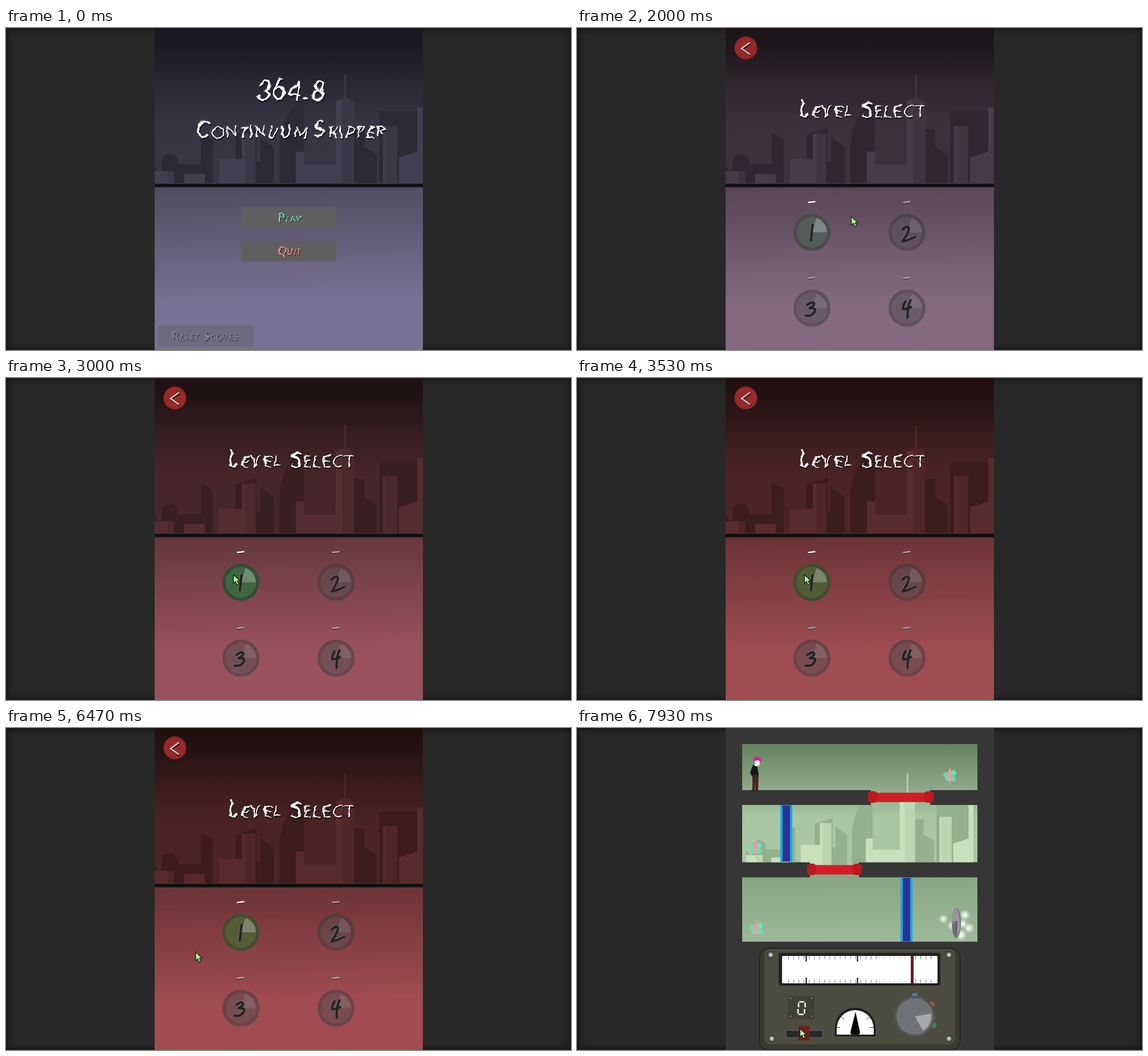
An HTML page for the animation above (8000 ms loop, 992x565 px).

```html
<!DOCTYPE html>
<html lang="en">
<head>
<meta charset="utf-8">
<title>Radio platformer</title>
<style>
html, body { margin: 0; width: 100%; height: 100%; overflow: hidden; background: #282828; }
svg { display: block; position: absolute; left: 0; top: 0; width: 992px; height: 565px; }
.edge { position: absolute; left: 0; top: 0; width: 992px; height: 565px; box-shadow: inset 0 0 12px 2px #131313; }

.menus { isolation: isolate; --dark: #5e5e5e; --mid: #7d7d7d; --light: #8c8c8c; }
.game { --dark: #94b18e; --mid: #bad7b1; --light: #c6e1bc; }
.shade { mix-blend-mode: multiply; }
.d { fill: var(--dark); }
.m { fill: var(--mid); }
.l { fill: var(--light); }

.hand { font: italic 500 40px Lato, "Open Sans", sans-serif; font-variant: small-caps; text-anchor: middle; fill: #fff; }
.title { letter-spacing: 2.7px; filter: url(#rough) drop-shadow(1px 2px 0 #08080c); }
.small { font-size: 21px; letter-spacing: 1px; filter: url(#scrawl) drop-shadow(1px 1px 0 #17171b); }
.num { fill: none; stroke: #232325; stroke-width: 4; stroke-linecap: round; stroke-linejoin: round; filter: drop-shadow(-.6px -.6px 0 #6a6a6c); }
.off { fill: #524c52; fill-opacity: .5; stroke: none; }
.rim { fill: none; stroke: #383a3e; stroke-opacity: .5; stroke-width: 5.5; }
.dash { stroke: #a9a6ad; stroke-width: 2.4; filter: drop-shadow(.5px 1.5px 0 #1a1a1d); }

.tint { animation: tint 8s linear infinite; }
.knob { animation: knob 8s linear infinite; }
.knobrim { animation: rim 8s linear infinite; }
.main { animation: main 8s step-end infinite; }
.menus { animation: menus 8s step-end infinite; }
.levels { animation: levels 8s step-end infinite; }
.game { animation: game 8s step-end infinite; }
.cursor { animation: move 8s linear infinite; }
.hero { animation: land 8s linear infinite; }
.glow { animation: glow .8s ease-in-out infinite alternate; transform-box: fill-box; transform-origin: center; }
.late { animation-delay: -.4s; }

@keyframes main { 0% { visibility: visible } 19.125%, 100% { visibility: hidden } }
@keyframes levels { 0% { visibility: hidden } 19.125% { visibility: visible } 82.5%, 100% { visibility: hidden } }
@keyframes menus { 0% { visibility: visible } 82.5%, 100% { visibility: hidden } }
@keyframes game { 0% { visibility: hidden } 82.5%, 100% { visibility: visible } }
@keyframes tint {
  0%, 19.125% { fill: #797193 } 30% { fill: #8d6272 }
  37.5% { fill: #99525c } 45%, 100% { fill: #a14c50 }
}
@keyframes knob {
  0%, 19.125% { fill: #575a5a } 30% { fill: #565e5d }
  37.5% { fill: #3e663f } 45%, 100% { fill: #555c36 }
}
@keyframes rim {
  0%, 19.125% { stroke: #4a4c4a } 30% { stroke: #484d4b }
  37.5% { stroke: #344d33 } 45%, 100% { stroke: #414e30 }
}
@keyframes land { 0%, 83% { transform: translateY(-4px) } 88%, 100% { transform: none } }
@keyframes glow { from { opacity: .75; transform: scale(.88) } to { opacity: 1; transform: scale(1.06) } }
@keyframes move {
  0%, .8% { transform: translate(612px, 567px); animation-timing-function: ease-out }
  10.875% { transform: translate(493px, 331px) }
  13.3% { transform: translate(493px, 331px) }
  13.375%, 23.5% { transform: translate(493px, 330px) }
  30% { transform: translate(442px, 332px) }
  34.4%, 50.8% { transform: translate(399px, 345px) }
  52.5% { transform: translate(432px, 366px) }
  55.9%, 59.125% { transform: translate(415px, 341px) }
  60.9% { transform: translate(455px, 367px) }
  64.1% { transform: translate(597px, 318px) }
  66.6% { transform: translate(510px, 265px) }
  69.125% { transform: translate(410px, 250px) }
  70%, 73.3% { transform: translate(410px, 249px) }
  77.5% { transform: translate(340px, 380px) }
  80.875% { transform: translate(332px, 393px) }
  82.5%, 87% { transform: translate(395px, 362px) }
  94.125% { transform: translate(397px, 466px) }
  99.125%, 100% { transform: translate(391px, 527px) }
}
</style>
</head>
<body>
<div class="edge"></div>

<svg class="menus" viewBox="0 0 992 565">
  <defs>
    <linearGradient id="sky" x2="0" y2="1">
      <stop offset=".05" stop-color="#353535"/><stop offset=".13" stop-color="#393939"/>
      <stop offset=".36" stop-color="#5a5a5a"/><stop offset=".62" stop-color="#757575"/>
      <stop offset="1" stop-color="#777"/>
    </linearGradient>
    <linearGradient id="ground" x2=".04" y2="1">
      <stop offset="0" stop-color="#a8a8a8"/><stop offset=".72" stop-color="#fff"/>
    </linearGradient>
    <linearGradient id="floor" x2="0" y2="1">
      <stop offset="0" stop-color="#1f1c22"/><stop offset=".4" stop-color="#0d0c0f"/><stop offset="1" stop-color="#151317"/>
    </linearGradient>
    <filter id="rough" x="-10%" y="-30%" width="120%" height="160%" color-interpolation-filters="sRGB">
      <feTurbulence baseFrequency=".045" numOctaves="2" seed="4"/>
      <feDisplacementMap in="SourceGraphic" scale="9" xChannelSelector="R" yChannelSelector="G"/>
    </filter>
    <filter id="scrawl" x="-10%" y="-30%" width="120%" height="160%" color-interpolation-filters="sRGB">
      <feTurbulence baseFrequency=".08" numOctaves="2" seed="7"/>
      <feDisplacementMap in="SourceGraphic" scale="4" xChannelSelector="R" yChannelSelector="G"/>
    </filter>
    <clipPath id="column"><path d="M261 0H732V565H261Z"/></clipPath>
    <g id="city">
      <path class="d" d="M261 238L266 250H273V235A14.500 14.500 0 0 1 302 235V239H342V183L363 196V272H261Z"/>
      <path class="m" d="M284 251H295V272H284Z"/>
      <path class="l" d="M261 251H284V272H261ZM313 256H349V272H313Z"/>
      <path class="d" d="M403 187L440 175V235H446V192L470 209V272H403ZM480 272V210Q482 150 523 125V272Z"/>
      <path class="l" d="M374 230H414V185H420V272H374Z"/>
      <path class="m" d="M420 185H438V272H420Z"/>
      <path class="d" d="M611 177H629V209L651 222V272H611ZM655 146H722V272H655Z"/>
      <path class="m" d="M585 128V124H594V82H597V124H604V128H611V272H590V128ZM666 172H687V272H666Z"/>
      <path class="l" d="M509 217H523V240H579V128H590V272H509ZM662 172H666V272H662Z"/>
      <path class="l" d="M690 227L722 217V140H732V272H690Z"/>
    </g>
    <g id="disk">
      <circle class="off" r="27"/><circle class="rim" r="29.750"/>
      <path d="M0 0L8 -25A26 26 0 0 1 26 0Z" fill="#fff" fill-opacity=".1"/>
    </g>
    <path id="dash" d="M-7 .7L6 -.7"/>
  </defs>

  <rect class="tint" x="261" width="471" height="565"/>
  <g class="shade" clip-path="url(#column)">
    <path d="M261 0H732V272H261Z" fill="url(#sky)"/>
    <use href="#city"/>
    <path d="M261 279H732V565H261Z" fill="url(#ground)"/>
  </g>
  <path d="M261 272.500H732V279.500H261Z" fill="url(#floor)"/>

  <g class="main">
    <text class="hand title" x="497" y="124" rotate="4 -6 5 0 7" style="font-size:49px;letter-spacing:0">364.8</text>
    <text class="hand title" x="500" y="190" rotate="-3 4 -4 5 0 -5 4 -3 4 0 -5 3 -4 5 -3 4 -5">Continuum Skipper</text>
    <path d="M413 314H580V352H413ZM413 373H580V409H413Z" fill="#5f5f60"/>
    <path d="M267 522H435V559H267Z" fill="#5f5f60" fill-opacity=".38"/>
    <text class="hand small" x="497" y="339" rotate="-5 4 -4 6" style="fill:#6df5d8">Play</text>
    <text class="hand small" x="497" y="397" rotate="5 -4 3 -5" style="fill:#ff9a8c">Quit</text>
    <text class="hand small" x="349" y="547" rotate="-4 5 -4 3 -3 0 5 -3 4 -5 3 -4" style="fill:#918d9c" opacity=".8">Reset Scores</text>
  </g>

  <g class="levels">
    <circle cx="296.500" cy="35" r="19.500" fill="#98292b" stroke="#7e2225" stroke-width="1.500"/>
    <path d="M303.500 25.500L289 36L303.500 46.500" fill="none" stroke="#c9c3c4" stroke-width="2.600" style="filter:drop-shadow(1px 2px 0 #221315)"/>
    <text class="hand title" x="499" y="154" rotate="-3 4 -5 4 -3 0 5 -3 4 -5 4 -3" style="letter-spacing:3.100px">Level Select</text>
    <g transform="translate(412.500 358.500)">
      <circle class="knob" r="27.500"/><circle class="knobrim" r="29.750" fill="none" stroke-width="5.500"/>
      <path d="M0 0L8 -25A26 26 0 0 1 26 0Z" fill="#fff" fill-opacity=".25"/>
      <path class="num" d="M1 -13L-2 14"/>
      <use href="#dash" class="dash" y="-53" style="stroke:#fff"/>
    </g>
    <g transform="translate(579.500 358.500)">
      <use href="#disk"/><use href="#dash" class="dash" y="-53"/>
      <path class="num" d="M-8 -5Q0 -13 3 -8Q4 -2 -8 16Q2 14 14 8"/>
    </g>
    <g transform="translate(412.500 491.500)">
      <use href="#disk"/><use href="#dash" class="dash" y="-53"/>
      <path class="num" d="M-8 -6Q2 -13 4 -8Q4 -4 -4 0Q8 -1 5 6Q0 15 -11 13"/>
    </g>
    <g transform="translate(579.500 491.500)">
      <use href="#disk"/><use href="#dash" class="dash" y="-53"/>
      <path class="num" d="M-3 -12Q-8 -2 -7 2Q0 2 7 -2M6 -14Q0 0 1 17"/>
    </g>
  </g>
</svg>

<svg class="game" viewBox="0 0 992 565">
  <defs>
    <linearGradient id="air" gradientUnits="userSpaceOnUse" x1="490" y1="28" x2="490" y2="241">
      <stop offset="0" stop-color="#64815d"/><stop offset=".38" stop-color="#8faa88"/>
      <stop offset=".6" stop-color="#a8c6a1"/><stop offset="1" stop-color="#aac8a3"/>
    </linearGradient>
    <linearGradient id="field" x2=".04" y2="1">
      <stop offset="0" stop-color="#84a27f"/><stop offset="1" stop-color="#9bb996"/>
    </linearGradient>
    <radialGradient id="steel"><stop offset="0" stop-color="#eee"/><stop offset=".5" stop-color="#aaa"/><stop offset="1" stop-color="#555"/></radialGradient>
    <radialGradient id="puff"><stop offset=".25" stop-color="#fff"/><stop offset="1" stop-color="#fff" stop-opacity="0"/></radialGradient>
    <clipPath id="rooms"><path d="M290 28H703V109H620V135H703V235.500H495V262H703V375H290V262H409V235.500H290V135H516V109H290Z"/></clipPath>
    <g id="gem">
      <g class="glow" fill="#63e8bd">
        <circle cx="-6" cy="-2" r="5" opacity=".8"/><circle cx="7" cy="-5" r="5"/>
        <circle cx="6" cy="5" r="5" opacity=".85"/><circle cx="-3" cy="5" r="4"/>
      </g>
      <path d="M1 -14Q5 -6 3 2L1 18L-1 9Q-6 -4 1 -14Z" fill="#f39a9d"/>
    </g>
    <g id="screw"><circle r="6" fill="#33342c"/><circle r="5" fill="url(#steel)"/></g>
    <g id="bolt"><circle r="3.500" fill="#2b2b26"/><circle r="2.500" fill="#62625a"/></g>
    <path id="cap" d="M0 3L4 0H12L16 3V17L12 20H4L0 17Z" fill="#bd1822"/>
  </defs>

  <path d="M261 0H732V565H261Z" fill="#363636"/>
  <g clip-path="url(#rooms)">
    <path d="M290 28H703V241H290Z" fill="url(#air)"/>
    <use href="#city" transform="matrix(.847 0 0 .853 76 9)"/>
    <path d="M290 241H703V375H290Z" fill="url(#field)"/>
  </g>

  <path d="M357 135H378V235H357ZM568 262H589V375H568Z" fill="#14a8e8"/>
  <path d="M361 136H374V234H361ZM572 263H585V374H572Z" fill="#2e3192"/>
  <path d="M520 113.500H618V130H520ZM412 240.500H492V257H412Z" fill="#d51d27"/>
  <use href="#cap" x="511" y="111"/><use href="#cap" x="610" y="111"/>
  <use href="#cap" x="404" y="238"/><use href="#cap" x="484" y="238"/>

  <use href="#gem" x="654" y="84"/><use href="#gem" x="313" y="211"/><use href="#gem" x="314" y="352"/>

  <g fill="url(#puff)">
    <g class="glow"><circle cx="640" cy="334" r="10"/><circle cx="691" cy="352" r="11"/><circle cx="658" cy="347" r="10"/></g>
    <g class="glow late"><circle cx="681" cy="327" r="10"/><circle cx="674" cy="364" r="11"/><circle cx="677" cy="343" r="9"/></g>
  </g>
  <ellipse cx="666" cy="342" rx="8" ry="26.500" fill="#6f6f74"/>
  <path d="M665 316Q657 325 658 344L666 340L668 346L665 368Q675 360 672 335Q670 318 665 316Z" fill="#96969b"/>
  <path d="M660 340L667 339L666 366" fill="none" stroke="#4a4a4e"/>

  <g class="hero">
    <path d="M308 80H319L318 109H320V112H313L313 90L312 112H305L308 106Z" fill="#45221e"/>
    <path d="M309 65H316L319 82H307L308 86L304 79Z" fill="#17171a"/>
    <path d="M308 70L305 78L309 84" fill="none" stroke="#17171a" stroke-width="2"/>
    <path d="M311 55H321V64L317 67H312Z" fill="#f4f0f4"/>
    <path d="M309 56L311 51H320L323 54V60L319 57H313L311 61Z" fill="#ed168c"/>
    <path d="M311 58L313 63" stroke="#35b8d0" stroke-width="2"/>
  </g>

  <rect x="320.500" y="386.500" width="352" height="178" rx="15" fill="#393a31" stroke="#171714"/>
  <rect x="329" y="388" width="335" height="167" rx="10" fill="#4c4c40"/>
  <use href="#screw" x="340" y="398"/><use href="#screw" x="653" y="398"/>
  <use href="#screw" x="342" y="545"/><use href="#screw" x="653" y="545"/>

  <rect x="354" y="394.500" width="284" height="57.500" rx="3" fill="#222225"/>
  <rect x="360" y="400" width="273" height="48" rx="2" fill="#fff"/>
  <path d="M371 403H530M371 444.500H530M594 403H628M594 444.500H628" stroke="#777" stroke-width="6" stroke-dasharray="1 8.050"/>
  <path d="M530 403H580M530 444.500H580" stroke="#ccc" stroke-width="6" stroke-dasharray="1 8.050"/>
  <path d="M402.500 400V410M402.500 438V448M492.500 400V410M492.500 438V448" stroke="#111" stroke-width="2"/>
  <path d="M586 400H591V448H586Z" fill="#701c1e"/>

  <rect x="370" y="470" width="47" height="41" rx="4" fill="#404037"/>
  <use href="#bolt" x="375" y="474"/><use href="#bolt" x="412" y="474"/>
  <use href="#bolt" x="375" y="506"/><use href="#bolt" x="412" y="506"/>
  <path d="M390 480.500H399M389 482V490M388 493V501M389 502.500H398M400.500 482V490M399.500 493V501" stroke="#f4f4f4" stroke-width="2.600"/>

  <rect x="366.500" y="530.500" width="65" height="13" fill="#29292b" stroke="#555558" stroke-width="2"/>
  <path d="M389 523H408V548H389Z" fill="#761a1c"/>

  <path d="M452 542V526A36.500 36 0 0 1 525 526V542Z" fill="#202022" stroke="#56564f"/>
  <path d="M456 538V528A32.500 33 0 0 1 521 528V538Z" fill="#fff"/>
  <path d="M464 507L469 512M513 507L508 512M514 525.500H521M456 525.500H462" stroke="#333"/>
  <path d="M489 498L497 534Q497 538 493 538H484Q480 538 480 534Z" fill="#080808"/>

  <g transform="translate(593 506)">
    <rect x="-4.500" y="-41" width="9" height="8" rx="2" fill="#5674a8"/>
    <rect x="-4.500" y="-41" width="9" height="8" rx="2" fill="#a84c48" transform="rotate(54)"/>
    <rect x="-4.500" y="-41" width="9" height="8" rx="2" fill="#438a4d" transform="rotate(115)"/>
    <circle r="36" fill="#535659"/><circle r="32" fill="#707376"/>
    <path d="M0 0L28.500 -5A29 29 0 0 1 14.500 25Z" fill="#a6a9a9"/>
  </g>
</svg>

<svg viewBox="0 0 992 565">
  <path class="cursor" d="M.5 .5V15.500L4 12L6.500 18L9.500 16.500L7 11H12Z" fill="#b4ff9c" stroke="#10160e" stroke-width="1.200"/>
</svg>
</body>
</html>
```
